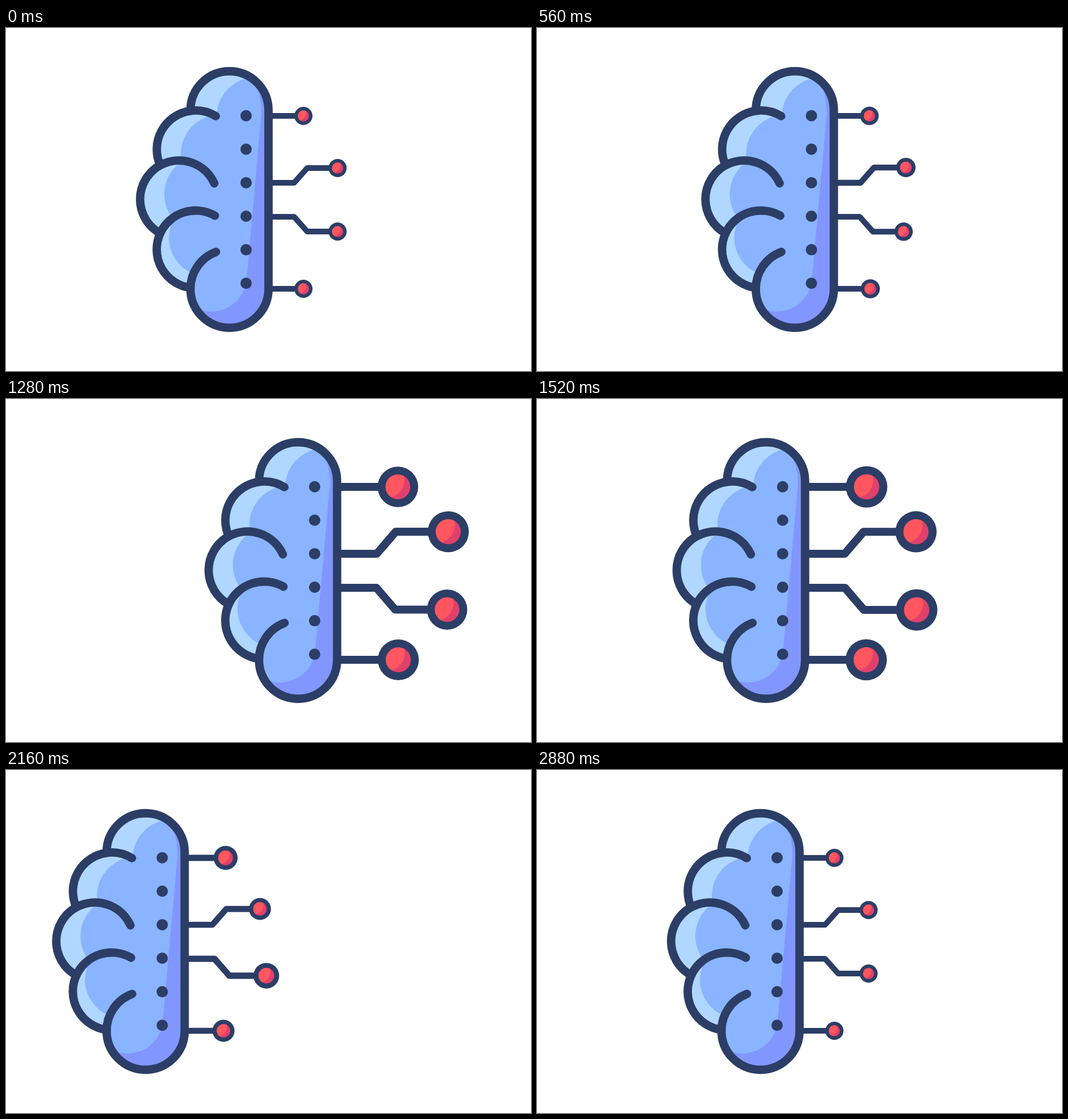
These frames come from a looping animation (925 by 605 pixels, 2960 ms). An HTML page:

```html
<!DOCTYPE html>
<html lang="en">
<head>
<meta charset="utf-8">
<title>Brain circuit</title>
<style>
  html, body { margin: 0; width: 100%; height: 100%; overflow: hidden; background: #fff; }
  svg { display: block; width: 925px; height: 605px; }
  .line { fill: none; stroke: #2c3e66; stroke-linecap: round; stroke-linejoin: round; }
  .ink { fill: #2c3e66; }
</style>
</head>
<body>
<svg viewBox="0 0 925 605">
  <defs>
    <path id="outline" d="M325 145A68.7 68.7 0 0 1 462.5 145V460A68.7 68.7 0 0 1 325 460V458.4
      A68.5 68.5 0 0 1 271.7 362.1A68.5 68.5 0 0 1 271.7 242.1A68.5 68.5 0 0 1 325 146.1Z"/>
    <clipPath id="inside"><use href="#outline"/></clipPath>
    <clipPath id="lens"><circle r=".61"/></clipPath>
    <g id="bulb">
      <circle class="ink" r="1"/>
      <circle r=".61" fill="#e0406c"/>
      <circle cx="-.55" cy="-.33" r=".87" fill="#ff565f" clip-path="url(#lens)"/>
    </g>
  </defs>
  <g id="brain">
    <g id="wires"></g>
    <g clip-path="url(#inside)">
      <path fill="#b0d7ff" d="M220 60H480V545H220Z"/>
      <g fill="#8ab4ff">
        <circle cx="440" cy="156" r="69"/>
        <circle cx="377" cy="222" r="69"/>
        <circle cx="348" cy="293" r="69"/>
        <circle cx="355.5" cy="370" r="68.5"/>
        <circle cx="393.5" cy="460" r="69"/>
        <path d="M376 150H470V460H376Z"/>
      </g>
      <path fill="#8296ff" d="M340 496A62 62 0 0 0 424 442L450 150Q450 118 437 95L475 100V545H330Z"/>
    </g>
    <g class="line" stroke-width="14.8">
      <use href="#outline"/>
      <path d="M325 146.1A68.5 68.5 0 0 1 369.6 155.4M271.7 242.1A68.5 68.5 0 0 1 367 274
        M271.7 362.1A68.5 68.5 0 0 1 368 331M325 460A69 69 0 0 1 370 395"/>
    </g>
    <g id="dots" class="ink"></g>
  </g>
</svg>
<script>
const LOOP = 2960, STEP = 80, BULB_LAG = 25;
const $ = id => document.getElementById(id);

// Goes from 0 to 1 between a and b, passing one half at mid.
function ease(t, a, mid, b, power = 2.7) {
  if (t <= a) return 0;
  if (t >= b) return 1;
  return t < mid
    ? 0.5 * ((t - a) / (mid - a)) ** power
    : 1 - 0.5 * ((b - t) / (b - mid)) ** power;
}

// turn: -1 bends up, 1 bends down, 0 runs straight
const nodes = [
  { y: 155, turn: 0, rise: 71, fall: 81 },
  { y: 273, turn: -1, rise: 0, fall: -20 },
  { y: 333, turn: 1, rise: 95, fall: 149 },
  { y: 460, turn: 0, rise: 15, fall: -18 }
];

$('wires').innerHTML = nodes.map(() => '<path class="line"/><use href="#bulb"/>').join('');
nodes.forEach((node, i) => {
  node.wire = $('wires').children[2 * i];
  node.bulb = $('wires').children[2 * i + 1];
});
$('dots').innerHTML = [0, 1, 2, 3, 4, 5]
  .map(i => `<circle cx="423" cy="${154.7 + 59.1 * i}" r="10"/>`).join('');

function swing(t) {
  return 141 * ease(t, 130, 585, 1040)
    - 293 * ease(t, 1040, 1540, 2040)
    + 152 * ease(t, 2040, 2460, 2880, 2.3);
}

function growth(t, { rise, fall }) {
  return ease(t - rise, 335, 800, 1424) - ease(t - fall, 1420, 1853, 2750);
}

function drawNode(node, t) {
  const { y, turn, wire, bulb } = node;
  const u = growth(t, node);
  const x = turn ? 584.2 + 75 * u : 524 + 47 * u;
  const endY = y + turn * (26 + 13 * u);
  const bend = turn ? `H${507.7 + 25 * u}L${530.7 + 35.5 * u} ${endY}` : '';
  wire.setAttribute('d', `M462 ${y}${bend}H${x}`);
  wire.setAttribute('stroke-width', 10 + 4.2 * u);
  const radius = 16 + 20.5 * growth(t - BULB_LAG, node);
  bulb.setAttribute('transform', `translate(${x} ${endY}) scale(${radius})`);
}

function draw() {
  const now = performance.now() % LOOP;
  const t = now - now % STEP;
  $('brain').setAttribute('transform', `translate(${swing(t)} 0)`);
  for (const node of nodes) drawNode(node, t);
  requestAnimationFrame(draw);
}
draw();
</script>
</body>
</html>
```
